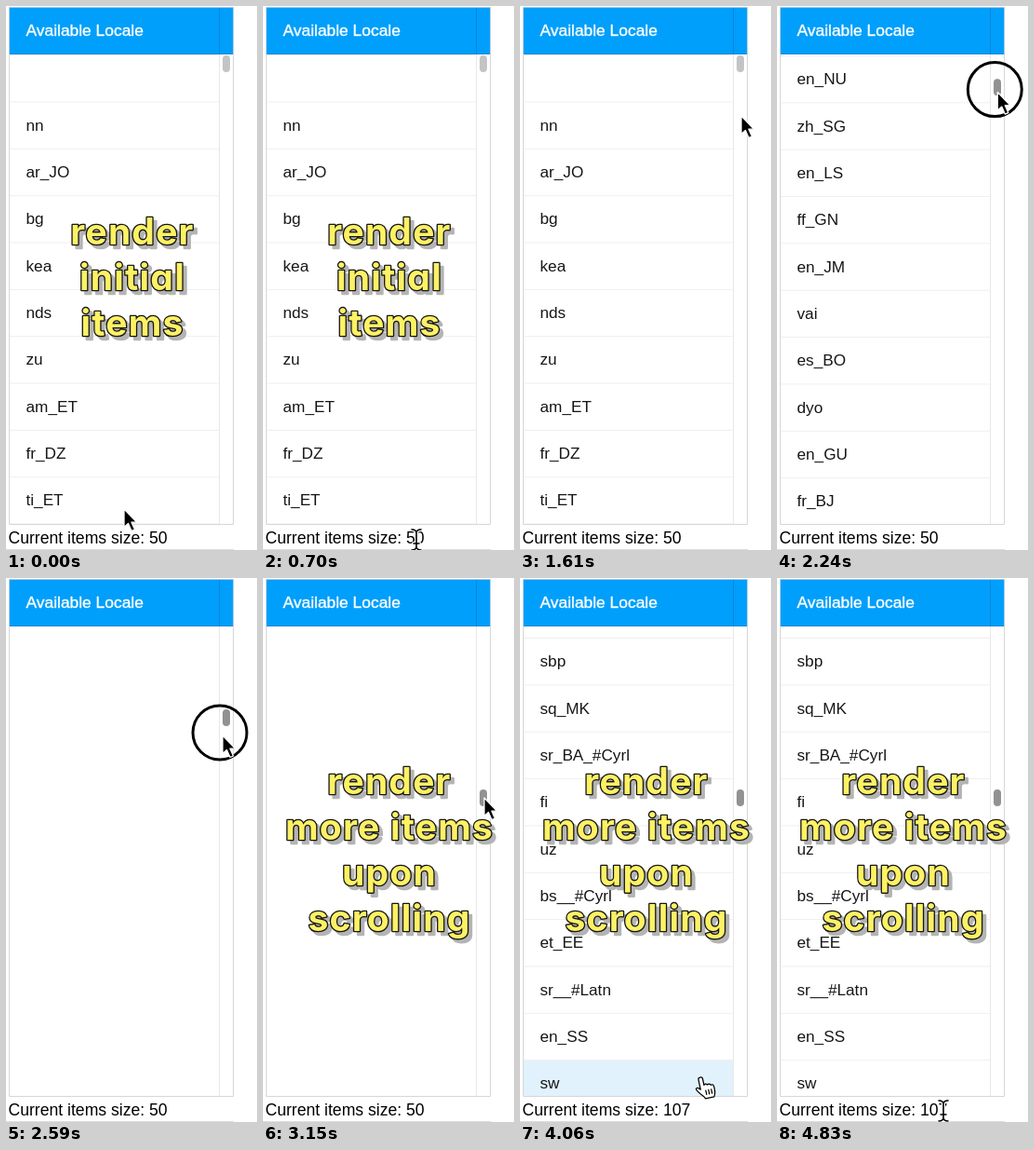
An HTML page that plays this animation: 270 px wide and 584 px high, repeating every 4.9 s.

```html
<!DOCTYPE html>
<html lang="en">
<head>
<meta charset="utf-8">
<title>Lazy list</title>
<style>
  html, body { margin: 0; width: 100%; height: 100%; overflow: hidden; background: #fff; }
  svg { display: block; }
  text { font: 17.2px "Liberation Sans", Arial, sans-serif; fill: #161616; }
  #stage > text { font-size: 17.6px; fill: #000; }
  #stage > .title { font-size: 17.4px; fill: #fff; stroke: #fff; stroke-width: .35; }
  .caption text {
    font: 700 39px Inter, sans-serif; font-feature-settings: "cv11"; letter-spacing: 1.2px;
    text-anchor: middle; fill: #fdf164; stroke: #151515; stroke-width: 2.6;
    stroke-linejoin: round; paint-order: stroke;
  }
  .caption .shade { fill: #b4b4b4; stroke: #b4b4b4; }
</style>
</head>
<body>
<svg id="stage" width="270" height="584" viewBox="0 0 270 584">
  <path d="M0 583.5H245" stroke="#ddd"/>
  <svg x="4" y="52" width="240" height="504" viewBox="4 52 240 504">
    <g id="list">
      <rect id="hover" x="4" width="225" fill="#e1f2fd"/>
      <g id="first"></g>
      <g id="more"></g>
    </g>
  </svg>
  <path d="M229.5 52V556" stroke="#e8e8e8"/>
  <path d="M3.5 52V556.5H244.5V52" fill="none" stroke="#d6d6d6"/>
  <rect x="4" y="2" width="240" height="50" fill="#009ffb"/>
  <path d="M4 51.5H244M229.5 2V52" stroke="#0b86d6"/>
  <path d="M3.5 52V1.5H244.5V52" fill="none" stroke="#a3c9e2"/>
  <rect id="thumb" x="233" width="8" height="18" rx="4"/>
  <text class="title" x="21.5" y="32">Available Locale</text>
  <text id="status" x="2.5" y="577"></text>
  <g id="intro" class="caption"></g>
  <g id="outro" class="caption"></g>
  <circle id="ring" r="29" fill="none" stroke="#000" stroke-width="3"/>
  <defs>
    <path id="beamShape" d="M-5 -11Q0 -11 0 -7Q0 -11 5 -11M0 -7V7M-5 11Q0 11 0 7Q0 11 5 11M-3 4H3"/>
  </defs>
  <g id="cursor" stroke-linejoin="round" stroke-linecap="round">
    <path id="arrow" d="M0 0V19.5L4.5 15.5L8 23.5L11.5 22L8 14.2H13.8Z" fill="#000" stroke="#fff" stroke-width="1.3"/>
    <g id="beam" fill="none">
      <use href="#beamShape" stroke="#fff" stroke-width="4"/>
      <use href="#beamShape" stroke="#000" stroke-width="1.6"/>
    </g>
    <path id="hand" transform="rotate(-12)" d="M-2.3 12V1Q-2.3 -1 0 -1T2.3 1V8Q4 6 6 8.5Q8 7 9.5 9.5Q12.5 8.5 12.5 12V16Q12.5 19 10.5 22.5H1Q0 20 -3 17Q-7 12 -7 10.5Q-5.5 8 -2.3 12ZM3 14V18.5M6 14V18.5M9 14V18.5" fill="#fff" stroke="#000" stroke-width="1.25"/>
  </g>
</svg>
<script>
const LOOP = 4900, STEP = 70, ROW = 50.35, TOP = 52.6, MORE_AT = 97;
const $ = id => document.getElementById(id);

const firstItems = (",nn,ar_JO,bg,kea,nds,zu,am_ET,fr_DZ,ti_ET,bo_CN,qu_EC,ta_SG,lv,en_NU,zh_SG,en_LS," +
  "ff_GN,en_JM,vai,es_BO,dyo,en_GU,fr_BJ,hr_BA,en_CK,ses,en_PW,fr_WF,hu,teo_UG,mas_KE,nl_AW," +
  "ca_ES,ro_MD,pt_MZ,de_AT,es_PE,ksh,lag,so_KE,gl,ar_SD,it_CH,yo_BJ,nb_NO,lt,mk,sv_FI,da").split(",");
const moreItems = "sbp sq_MK sr_BA_#Cyrl fi uz bs__#Cyrl et_EE sr__#Latn en_SS sw".split(" ");

const rows = (items, from) => items.map((name, i) => {
  const y = TOP + ROW * (from + i);
  return `<path d="M4 ${y}H229" stroke="#efefef"/><text x="21.5" y="${y + 30.7}">${name}</text>`;
}).join("");

const caption = (lines, y) => [["shade", 4], ["", 0]].map(([style, shift]) =>
  lines.map((line, i) =>
    `<text class="${style}" x="${136 + shift}" y="${y + 49 * i + shift}">${line}</text>`).join("")).join("");

$("first").innerHTML = rows(firstItems, 0);
$("more").innerHTML = rows(moreItems, MORE_AT);
$("intro").innerHTML = caption(["render", "initial", "items"], 256);
$("outro").innerHTML = caption(["render", "more items", "upon", "scrolling"], 231.5);

// Keys are [time, ...values], joined by straight lines.
const pointerKeys = [[0, 127, 540], [420, 165, 573], [1120, 165, 573], [1610, 238, 118],
  [1680, 249, 96], [1960, 239, 62], [2100, 239, 62], [2590, 233, 169], [2940, 238, 236],
  [3640, 238, 236], [3990, 194, 537], [4340, 194, 537], [4620, 179, 572], [LOOP, 179, 572]];
const thumbKeys = [[0, 53], [2100, 53], [2590, 141], [3010, 227], [LOOP, 227]];

function at(keys, t) {
  const i = keys.findIndex(k => k[0] > t), a = keys[i - 1], b = keys[i];
  const p = (t - a[0]) / (b[0] - a[0]);
  return a.slice(1).map((v, n) => v + (b[n + 1] - v) * p);
}
const ramp = (t, from, to) => Math.min(1, Math.max(0, (t - from) / (to - from)));
const show = (id, on) => $(id).setAttribute("visibility", on ? "visible" : "hidden");
const move = (id, x, y) => $(id).setAttribute("transform", `translate(${x} ${y})`);

function draw(t) {
  const [x, y] = at(pointerKeys, t), [thumbY] = at(thumbKeys, t);
  const scroll = (thumbY - 53) * 28;
  const loaded = t >= 3430;

  move("list", 0, -scroll);
  show("first", t < 2590);
  show("more", loaded);
  $("status").textContent = "Current items size: " + (loaded ? 107 : 50);
  $("thumb").setAttribute("y", thumbY);
  $("thumb").setAttribute("fill", t < 1960 ? "#c4c4c4" : "#929292");

  const overRow = t > 0 && x < 229 && y < 556;
  const row = Math.floor((y - TOP + scroll) / ROW);
  $("hover").setAttribute("y", TOP + row * ROW);
  $("hover").setAttribute("height", ROW);
  show("hover", overRow);

  $("intro").setAttribute("opacity", 1 - ramp(t, 840, 1120));
  $("outro").setAttribute("opacity", ramp(t, 2660, 2940));

  move("cursor", x, y);
  show("hand", overRow);
  show("beam", y >= 556);
  show("arrow", !overRow && y < 556);
  move("ring", x - 3, y - 3);
  show("ring", t >= 2100 && t < 3010);
}

function tick() {
  draw(Math.floor(performance.now() % LOOP / STEP) * STEP);
  requestAnimationFrame(tick);
}
tick();
</script>
</body>
</html>
```
